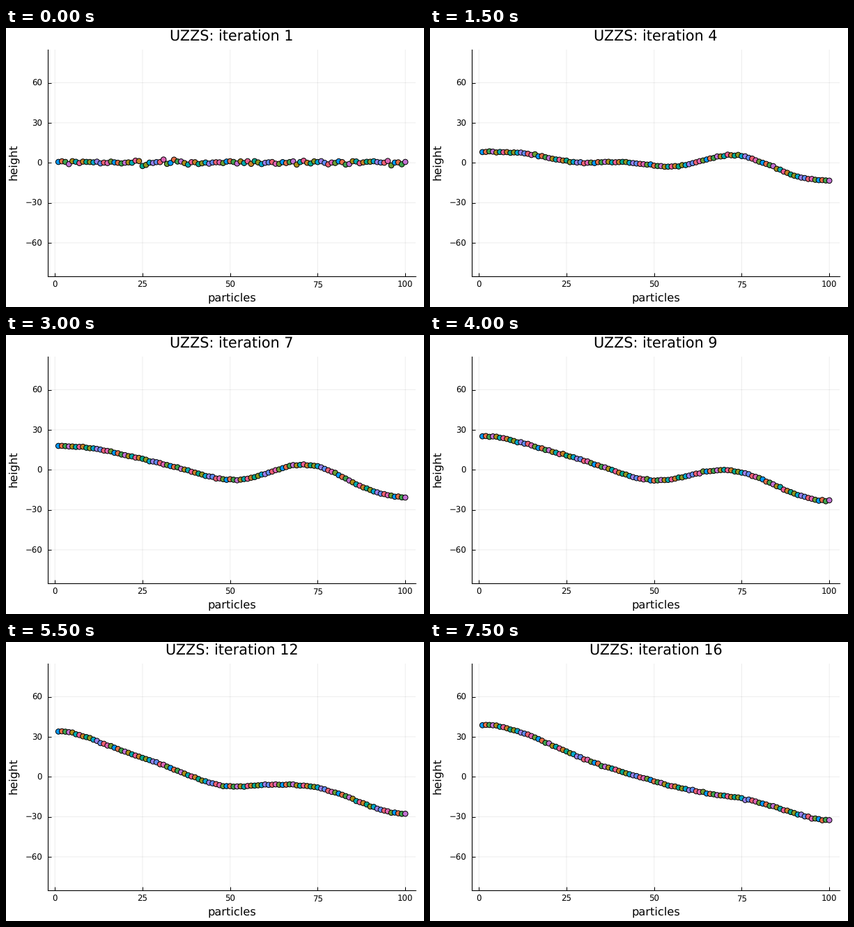
Recreate the animation shown at these times as a matplotlib script. Size 600 by 400 pixels, loop 8 s.

```python
import numpy as np
import matplotlib.pyplot as plt
from matplotlib.animation import FuncAnimation

W, H = 600, 400
N, STEPS = 100, 16

plt.rcParams.update({"font.family": "DejaVu Sans", "text.hinting": "none"})

PALETTE = ["#009afa", "#e36f47", "#3ea44e", "#c371d2", "#ac8e18", "#00aaae",
           "#ed5e93", "#c68225", "#00a98d", "#8e971e", "#00a9cc", "#9b7fe9",
           "#618df6", "#f06073", "#dd65b6", "#6c9f33"]

# The chain is a sum of cosine waves; each amplitude drifts between key steps
KEY_STEPS = [1, 4, 7, 11, 16]
AMPLITUDES = [
    [0, 5.2, 12.1, 20.8, 29.9],
    [0, -0.4, 2.2, 4.6, 3.9],
    [0, 4.8, 6.5, 7.0, 4.3],
    [0, -2.7, -4.7, -2.8, -0.5],
    [0, 2.0, 1.1, 1.1, 1.2],
    [0, 0.2, 1.0, 1.0, -0.4],
    [0, -1.2, -0.6, 0.7, 0.1],
]

particles = np.arange(1, N + 1)
phase = np.pi * (particles - 1) / (N - 1)


def heights(step):
    jitter = 1.0 if step == 1 else 0.25
    y = 0.3 + np.random.default_rng(step).normal(0, jitter, N)
    for k, amps in enumerate(AMPLITUDES, 1):
        y += np.interp(step, KEY_STEPS, amps) * np.cos(k * phase)
    return y


# 72 dpi makes one point equal one pixel
fig = plt.figure(figsize=(W / 72, H / 72), dpi=72, facecolor="white")
left, right, top, bottom = 60.3, 588.1, 30.7, 355.8
mid_x, mid_y = (left + right) / 2, (top + bottom) / 2

ax = fig.add_axes([left / W, 1 - bottom / H,
                   (right - left) / W, (bottom - top) / H])
ax.set(xlim=(-1.97, 102.97), ylim=(-85, 85),
       xticks=range(0, 101, 25), yticks=range(-60, 61, 30))
ax.set_axisbelow(True)
ax.grid(color="black", alpha=0.08, lw=0.9, snap=False)
ax.spines[["top", "right"]].set_visible(False)
ax.spines[["left", "bottom"]].set_linewidth(1.1)
ax.tick_params(direction="in", length=5, width=1, labelsize=11.8)
ax.tick_params(axis="x", pad=7.3)
ax.tick_params(axis="y", pad=8.2)


def label(x, y, text, size, angle=0):
    return fig.text(x / W, 1 - y / H, text, fontsize=size, rotation=angle,
                    rotation_mode="anchor", ha="center", va="baseline")


title = label(mid_x, 18.9, "", 20.7)
label(mid_x, 391.7, "particles", 16.3)
label(15.3, mid_y - 0.8, "height", 16.3, 90)

dots = ax.scatter(particles, heights(1), s=7.6 ** 2, linewidths=1,
                  c=[PALETTE[i % len(PALETTE)] for i in range(N)],
                  edgecolors="black", zorder=3, clip_on=False)


def update(i):
    step = i + 1
    title.set_text(f"UZZS: iteration {step}")
    dots.set_offsets(np.column_stack([particles, heights(step)]))
    return title, dots


anim = FuncAnimation(fig, update, frames=STEPS, interval=500,
                     repeat=True, repeat_delay=0, blit=False)
plt.show()
```
